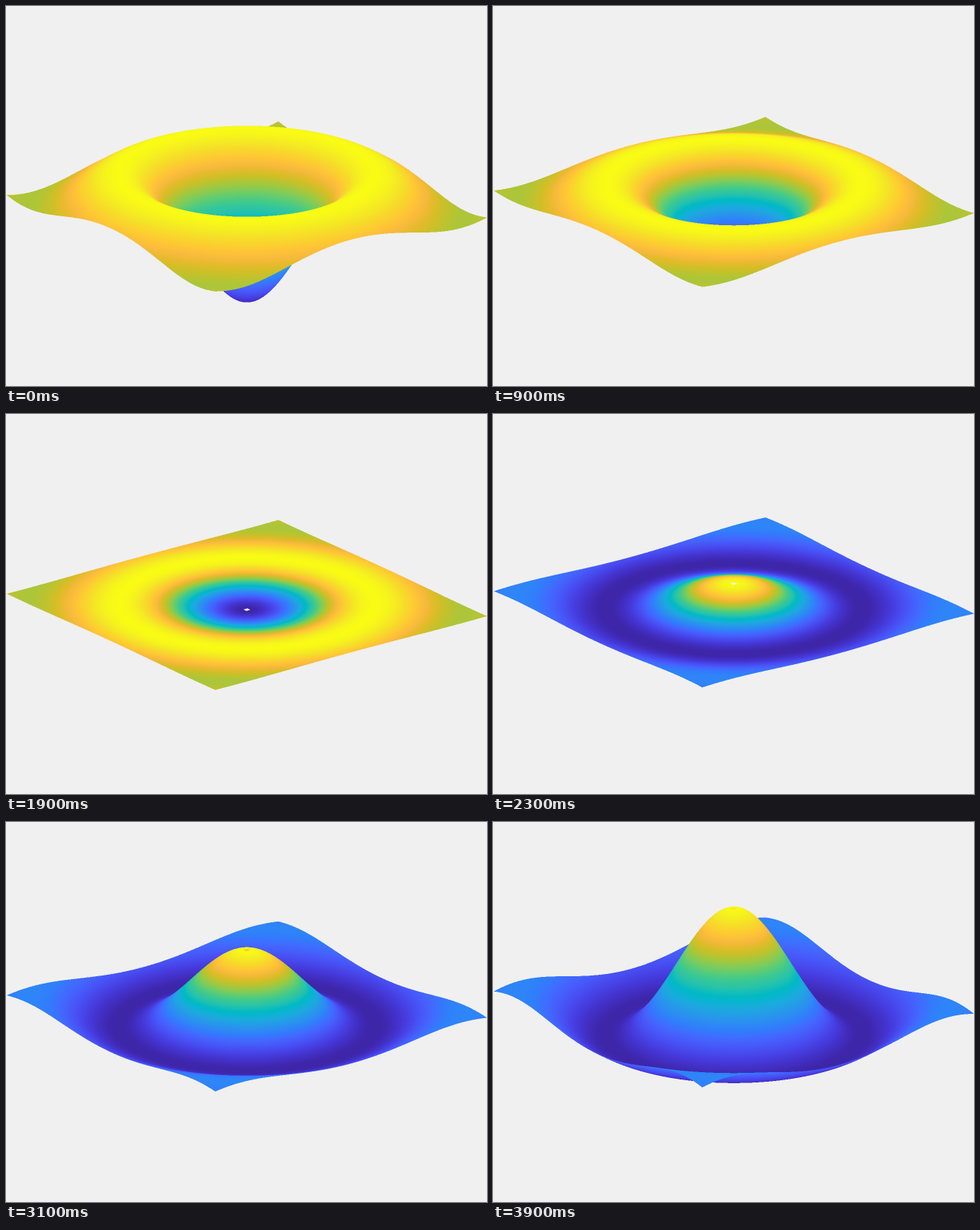
Write a matplotlib script that moves like this. It is 652x515 px and loops after 4 s.

```python
import numpy as np
import matplotlib.pyplot as plt
from matplotlib.animation import FuncAnimation
from matplotlib.colors import to_rgb

W, H, DPI = 652, 515, 100
FRAMES, INTERVAL = 40, 100
SS = 2                           # supersampling for smooth edges

HALF, CELL = 6.0, 0.1            # half side of the domain, mesh spacing
AZIMUTH = np.radians(37.5)
CX, CY = 326.5, 258.1            # screen position of the origin
X_SCALE, DEPTH_SCALE, Z_SCALE = 38.63, 13.67, 7.07

BACKGROUND = "#f0f0f0"
STOPS = """3e26a8 422ec0 4537d5 4741e5 484df0 4758f8 4563fd 3e6fff 327cfc
2e87f7 2b91ef 259be8 20a5e3 18addb 08b5d0 02bac3 19bfb6 2cc4a7 37c897 4acb84
64cd6f 81cc59 9dc943 b9c431 d1bf27 e6bb2d f8ba3d fec338 fccf30 f7dc2a f5e924
f7f51b f9fb15""".split()


def build_palette():
    """256 colours from dark blue to yellow, then the background."""
    rgb = np.array([to_rgb("#" + s) for s in STOPS])
    pos = np.append(np.arange(0, 63, 2), 63) / 63
    t = np.linspace(0, 1, 256)
    ramp = np.column_stack([np.interp(t, pos, rgb[:, c]) for c in range(3)])
    return np.vstack([ramp, to_rgb(BACKGROUND)]).astype(np.float32)


def sample_surface():
    """Column, flat row and sinc height of surface points, back to front."""
    cols = np.arange(W * SS)
    across = ((cols + 0.5) / SS - CX) / X_SCALE
    reach = HALF * np.sqrt(2)
    depth = np.arange(reach, -reach, -0.006)
    p, d = np.meshgrid(across, depth)
    x = np.abs(p * np.cos(AZIMUTH) + d * np.sin(AZIMUTH))
    y = np.abs(d * np.cos(AZIMUTH) - p * np.sin(AZIMUTH))
    # sin(r)/r is undefined at the origin, so the cells around it are missing
    keep = (np.maximum(x, y) <= HALF) & (np.maximum(x, y) >= CELL)
    r = np.hypot(x[keep], y[keep])
    col = np.broadcast_to(cols, p.shape)[keep]
    row = (CY - DEPTH_SCALE * d[keep]) * SS
    return col, row.astype(np.float32), (np.sin(r) / r).astype(np.float32)


palette = build_palette()
col, flat_row, height = sample_surface()
low, high = height.min(), height.max()
level = np.rint(255 * (height - low) / (high - low)).astype(np.int16)


def amplitude(k):
    """-20 to 20 in whole steps, leaving out zero."""
    return k - 20 if k < 20 else k - 19


def render(k):
    a = amplitude(k)
    row = (flat_row - SS * Z_SCALE * a * height).astype(np.int32)
    canvas = np.full(H * W * SS * SS, 256, dtype=np.int16)
    canvas[row * (W * SS) + col] = level if a > 0 else 255 - level
    grid = canvas.reshape(H, SS, W, SS)
    return sum(palette[grid[:, i, :, j]]
               for i in range(SS) for j in range(SS)) / SS ** 2


fig = plt.figure(figsize=(W / DPI, H / DPI), dpi=DPI, facecolor=BACKGROUND)
ax = fig.add_axes([0, 0, 1, 1])
ax.axis("off")
picture = ax.imshow(render(0), interpolation="nearest", aspect="auto")


def update(k):
    picture.set_data(render(k))
    return [picture]


anim = FuncAnimation(fig, update, frames=FRAMES, interval=INTERVAL,
                     repeat=True, repeat_delay=0)
plt.show()
```
